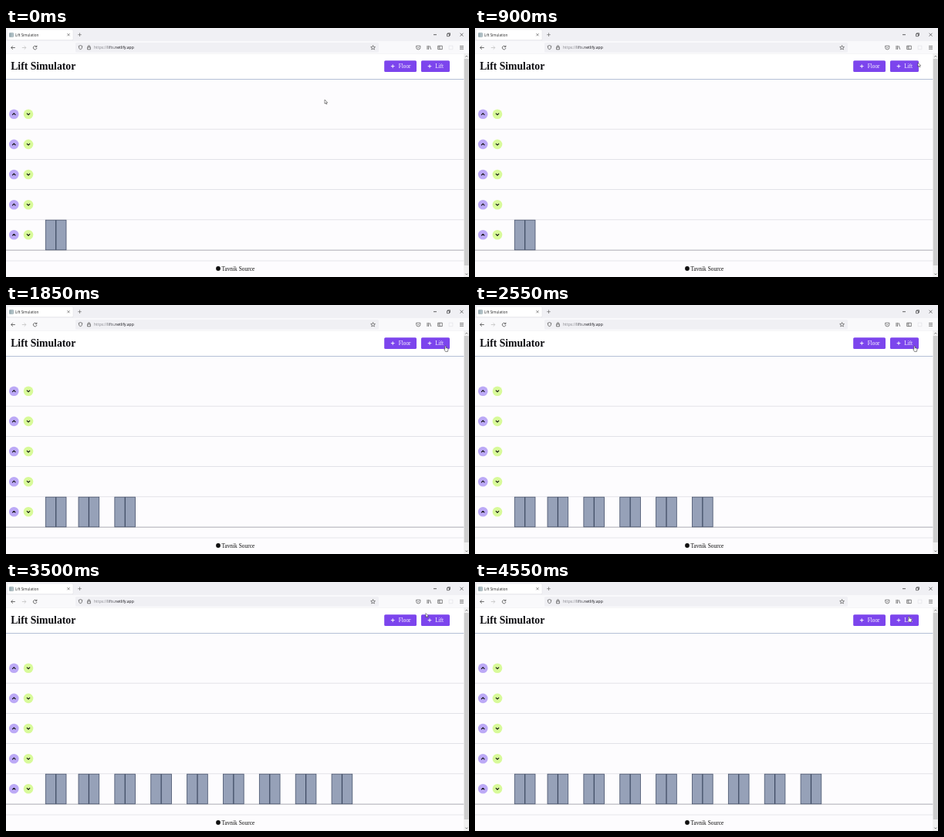
Write an HTML page with a canvas that moves like this. It is 600 px wide and 323 px high and loops after 4.6 s.

```html
<!DOCTYPE html>
<html lang="en">
<head>
<meta charset="utf-8">
<title>Lift Simulation</title>
<style>
  html, body { margin: 0; width: 100%; height: 100%; overflow: hidden; background: #fff; }
  canvas { display: block; width: 600px; height: 323px; }
</style>
</head>
<body>
<canvas id="stage"></canvas>
<script>
const W = 600, H = 323, LOOP = 4600;
const SERIF = '"Liberation Serif", serif';
const SANS = '"Open Sans", sans-serif';
const canvas = document.getElementById('stage');
const ctx = canvas.getContext('2d');
const dpr = window.devicePixelRatio || 1;
canvas.width = W * dpr;
canvas.height = H * dpr;

const ROWS = [111.7, 150.9, 190, 229.2, 268.3];
const FIRST_CLICK = 1550, CLICK_GAP = 222, MAX_LIFTS = 9;

// Pointer tip: [time, x, y]
const PATH = [
  [0, 413, 93], [200, 425, 91], [700, 562, 49], [900, 574, 45], [1050, 574, 46],
  [1250, 569, 53], [3200, 569, 53], [3500, 544, 40.5], [3750, 541, 40.5],
  [4200, 558, 44], [4400, 562, 44.5], [LOOP, 562, 44.5]
];

function rect(x, y, w, h, fill) {
  ctx.fillStyle = fill;
  ctx.fillRect(x, y, w, h);
}

function roundRect(x, y, w, h, r, fill) {
  ctx.beginPath();
  ctx.roundRect(x, y, w, h, r);
  ctx.fillStyle = fill;
  ctx.fill();
}

function disc(x, y, r, fill) {
  ctx.beginPath();
  ctx.arc(x, y, r, 0, Math.PI * 2);
  ctx.fillStyle = fill;
  ctx.fill();
}

function text(str, x, y, font, fill) {
  ctx.font = font;
  ctx.fillStyle = fill;
  ctx.fillText(str, x, y);
  return x + ctx.measureText(str).width;
}

// SVG path data drawn relative to (x, y)
function icon(x, y, data, stroke, width = 0.7, fill) {
  ctx.save();
  ctx.translate(x, y);
  const path = new Path2D(data);
  if (fill) { ctx.fillStyle = fill; ctx.fill(path); }
  ctx.strokeStyle = stroke;
  ctx.lineWidth = width;
  ctx.lineJoin = 'round';
  ctx.stroke(path);
  ctx.restore();
}

const CROSS = 'M-1.6-1.6 1.6 1.6M1.6-1.6-1.6 1.6';
const PLUS = 'M-2.3 0H2.3M0-2.3V2.3';

function drawTabs() {
  rect(0, 0, W, 17, '#f0f0f4');
  roundRect(1.2, 2, 86, 14, 1.5, '#d9d9df');
  roundRect(1.6, 2.2, 85.2, 13.4, 1.3, '#ffffff');
  icon(7, 9, 'M-2.4-2.4H2.4V2.4H-2.4ZM-2.4-.8H2.4M-2.4.8H2.4M-.8-2.4V2.4', '#6f8790', 0.6, '#dce8ea');
  text('Lift Simulation', 12, 10.6, '4.5px ' + SANS, '#222');
  icon(81, 8.7, CROSS, '#444', 0.6);
  icon(95.5, 8.7, PLUS, '#555', 0.6);
  icon(556, 8.7, 'M-2 0H2', '#222', 0.7);
  icon(573.5, 8.7, 'M-2-1H1V2H-2ZM-1-1V-2H2V1H1', '#222', 0.6);
  icon(590.5, 8.7, 'M-2-2 2 2M2-2-2 2', '#222', 0.6);
}

function drawToolbar() {
  rect(0, 17, W, 16.5, '#f9f9fb');
  roundRect(90, 19, 393, 12.6, 1.5, '#f0f0f4');
  rect(0, 33, W, 0.5, '#dedee3');
  icon(9.2, 25.5, 'M2.6 0H-2.4M-.3-2.2-2.5 0-.3 2.2', '#333');
  icon(23.4, 25.5, 'M-2.6 0H2.4M.3-2.2 2.5 0 .3 2.2', '#bbb');
  icon(37.6, 25.5, 'M1.8-1.4A2.3 2.3 0 1 0 2.3.5M2.3-2.8V-.9H.4', '#333');
  icon(96.5, 25.3, 'M0-2.7 2.3-1.8Q2.4 1.3 0 2.8-2.4 1.3-2.3-1.8Z', '#444');
  icon(107.5, 25.3, 'M-1.9-.4H1.9V2.5H-1.9ZM-1.2-.4V-1.4A1.2 1.2 0 0 1 1.2-1.4V-.4', '#444');
  const font = '5.07px ' + SANS;
  let x = text('https://', 114, 27.4, font, '#85858c');
  x = text('lifts.', x, 27.4, font, '#85858c' && '#4a4a52');
  text('netlify.app', x, 27.4, font, '#15141a');
  icon(475.6, 25.4, 'M0-2.9.8-.9 2.9-.8 1.3.6 1.8 2.6 0 1.5-1.8 2.6-1.3.6-2.9-.8-.8-.9Z', '#444', 0.6);
  icon(534.3, 25.3, 'M-2.6-2.1H2.6V0A2.6 2.6 0 0 1-2.6 0ZM-1.2-.5 0 .7 1.2-.5', '#444', 0.65);
  icon(548.3, 25.4, 'M-2.3-2.5V2.5M-.7-2.5V2.5M.7-2.3 2.5 2.4', '#444', 0.7);
  icon(562.5, 25.4, 'M-2.8-2.2H2.8V2.2H-2.8ZM-.5-2.2V2.2M-2-1H-1.2M-2 .2H-1.2', '#444', 0.65);
  icon(576.5, 25.4, 'M-2.4-2.3H2.4V2.3H-2.4Z', '#e0e0e4', 0.6);
  icon(590.5, 25.4, 'M-2.5-1.9H2.5M-2.5 0H2.5M-2.5 1.9H2.5', '#444', 0.65);
}

function drawButton(x, w, label, labelX) {
  roundRect(x, 42.2, w, 14.8, 1.6, '#7c45ed');
  icon(x + 11, 49.6, PLUS, '#fff', 0.9);
  text(label, labelX, 52, '7.2px ' + SERIF, '#fff');
}

function drawPage() {
  rect(0, 33.5, 593.5, 33, '#fff');
  rect(0, 66.5, 593.5, 257, '#fdfcfe');
  text('Lift Simulator', 6.2, 54.2, 'bold 13.7px ' + SERIF, '#0b0b0f');
  drawButton(490.2, 41.8, 'Floor', 508.8);
  drawButton(538, 37, 'Lift', 556.2);
  rect(0, 66.1, 593.5, 0.9, '#aebbd3');
  for (const y of [130.8, 170, 209.2, 248.4]) rect(0, y, 593.5, 0.8, '#dcdde3');
  rect(0, 287.7, 593.5, 0.9, '#a3a5ab');
  rect(0, 301.6, 593.5, 0.8, '#dedfe4');
  for (const y of ROWS) {
    disc(10.3, y, 6.3, '#bca9f6');
    disc(29, y, 6.3, '#d8fa9a');
    icon(10.3, y, 'M-2.1 1.1 0-1 2.1 1.1', '#111', 1.1);
    icon(29, y, 'M-2.1-1.1 0 1 2.1-1.1', '#111', 1.1);
  }
  disc(275, 312, 2.9, '#111');
  text('Tavnik Source', 279.4, 314.5, '7.4px ' + SERIF, '#111');
}

function drawScrollbar() {
  rect(593.5, 33.5, 6.5, 289.5, '#f0f0f0');
  rect(593.8, 40, 5.9, 268, '#cdcdcd');
  icon(596.8, 36.8, 'M-1.4.7 0-.7 1.4.7', '#555', 0.8);
  icon(596.8, 319.3, 'M-1.4-.7 0 .7 1.4-.7', '#555', 0.8);
}

function drawLift(i) {
  const x = i === 0 ? 51.3 : 94 + (i - 1) * 46.87;
  rect(x, 249.2, 26.7, 38.6, '#96a1b8');
  ctx.strokeStyle = '#46526b';
  ctx.lineWidth = 0.8;
  ctx.strokeRect(x, 249.2, 26.7, 38.6);
  rect(x + 12.8, 249.2, 1.2, 38.6, '#3b475f');
}

function liftCount(t) {
  if (t < FIRST_CLICK) return 1;
  return Math.min(MAX_LIFTS, 2 + Math.floor((t - FIRST_CLICK) / CLICK_GAP));
}

function pointerAt(t) {
  const i = PATH.findIndex(p => p[0] > t);
  const [t0, x0, y0] = PATH[i - 1], [t1, x1, y1] = PATH[i];
  const u = (t - t0) / (t1 - t0), k = u * u * (3 - 2 * u);
  return [x0 + (x1 - x0) * k, y0 + (y1 - y0) * k];
}

function drawPointer(x, y) {
  const overButton = y > 42 && y < 57 && ((x > 490 && x < 532) || (x > 538 && x < 573.5));
  if (overButton) {
    icon(x, y, 'M0 .3Q.8-.2 1.2.5V2.6L3.6 3.2Q4.2 3.5 4 4.5L3.4 7.4H.5L-1.2 4.8Q-1.2 4-.2 4.4V.6Z', '#222', 0.55, '#fff');
  } else {
    icon(x, y, 'M0 0V5.2L1.2 4.1 2 5.9 2.9 5.5 2.1 3.8H3.7Z', '#222', 0.5, '#fff');
  }
}

function frame(now) {
  const t = now % LOOP;
  ctx.setTransform(dpr, 0, 0, dpr, 0, 0);
  drawTabs();
  drawToolbar();
  drawPage();
  drawScrollbar();
  for (let i = 0; i < liftCount(t); i++) drawLift(i);
  drawPointer(...pointerAt(t));
}

const start = performance.now();
function tick() {
  frame(performance.now() - start);
  requestAnimationFrame(tick);
}
tick();
</script>
</body>
</html>
```
